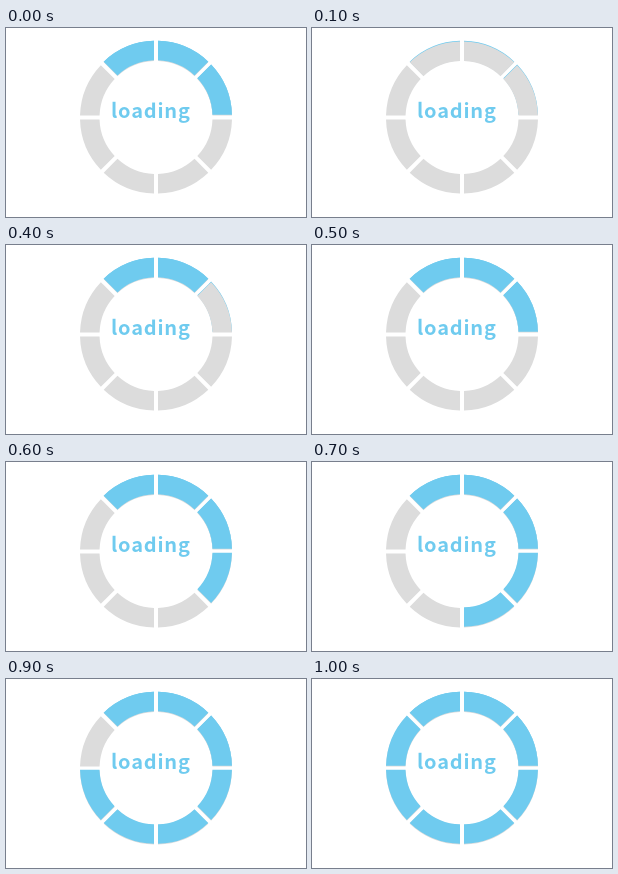
Write an HTML page that moves like this. It is 300 px wide and 189 px high and loops after 1.1 s.

```html
<!DOCTYPE html>
<html lang="en">
<head>
<meta charset="utf-8">
<title>Loading</title>
<style>
  html, body { margin: 0; height: 100%; overflow: hidden; background: #fff; }
  svg { display: block; width: 100vw; height: 100vh; }
  text { font: 700 20px "Noto Sans CJK SC", "Noto Sans CJK JP", "Noto Sans", sans-serif; letter-spacing: .8px; }
</style>
</head>
<body>
<svg viewBox="0 0 300 189">
  <g id="ring" transform="translate(150 89.5)"></g>
  <text x="105" y="90" fill="#6fcbef">loading</text>
</svg>
<script>
const BLUE = '#6fcbef', GREY = '#dcdcdc';
const OUTER = 76, INNER = 56.5, GAP = 4, COUNT = 8, STEP = 100, LOOP = 1100;
const LIFT = -0.7; // blue segments sit slightly above the grey ones
const ring = document.getElementById('ring');

// Point on a circle, moved half a gap sideways from a spoke.
function point(radius, turn, side) {
  const angle = turn * 2 * Math.PI / COUNT + side * Math.asin(GAP / 2 / radius);
  return `${radius * Math.sin(angle)} ${-radius * Math.cos(angle)}`;
}

// Segments run clockwise from the upper left.
function segment(i, color, y) {
  const path = document.createElementNS('http://www.w3.org/2000/svg', 'path');
  path.setAttribute('d',
    `M${point(OUTER, i - 1, 1)}A${OUTER} ${OUTER} 0 0 1 ${point(OUTER, i, -1)}` +
    `L${point(INNER, i, -1)}A${INNER} ${INNER} 0 0 0 ${point(INNER, i - 1, 1)}Z`);
  path.setAttribute('fill', color);
  path.setAttribute('transform', `translate(0 ${y})`);
  ring.append(path);
  return path;
}

const layer = (count, color, y) =>
  Array.from({ length: count }, (_, i) => segment(i, color, y));

layer(3, BLUE, LIFT); // leaves a faint blue rim when unlit
layer(COUNT, GREY, 0);
const lights = layer(COUNT, BLUE, LIFT);

function litCount(time) {
  const step = Math.floor(time % LOOP / STEP);
  return step === 0 ? 3 : Math.max(0, step - 2);
}

function draw(now) {
  const lit = litCount(now);
  lights.forEach((light, i) => light.setAttribute('visibility', i < lit ? 'visible' : 'hidden'));
  requestAnimationFrame(draw);
}
draw(performance.now());
</script>
</body>
</html>
```
